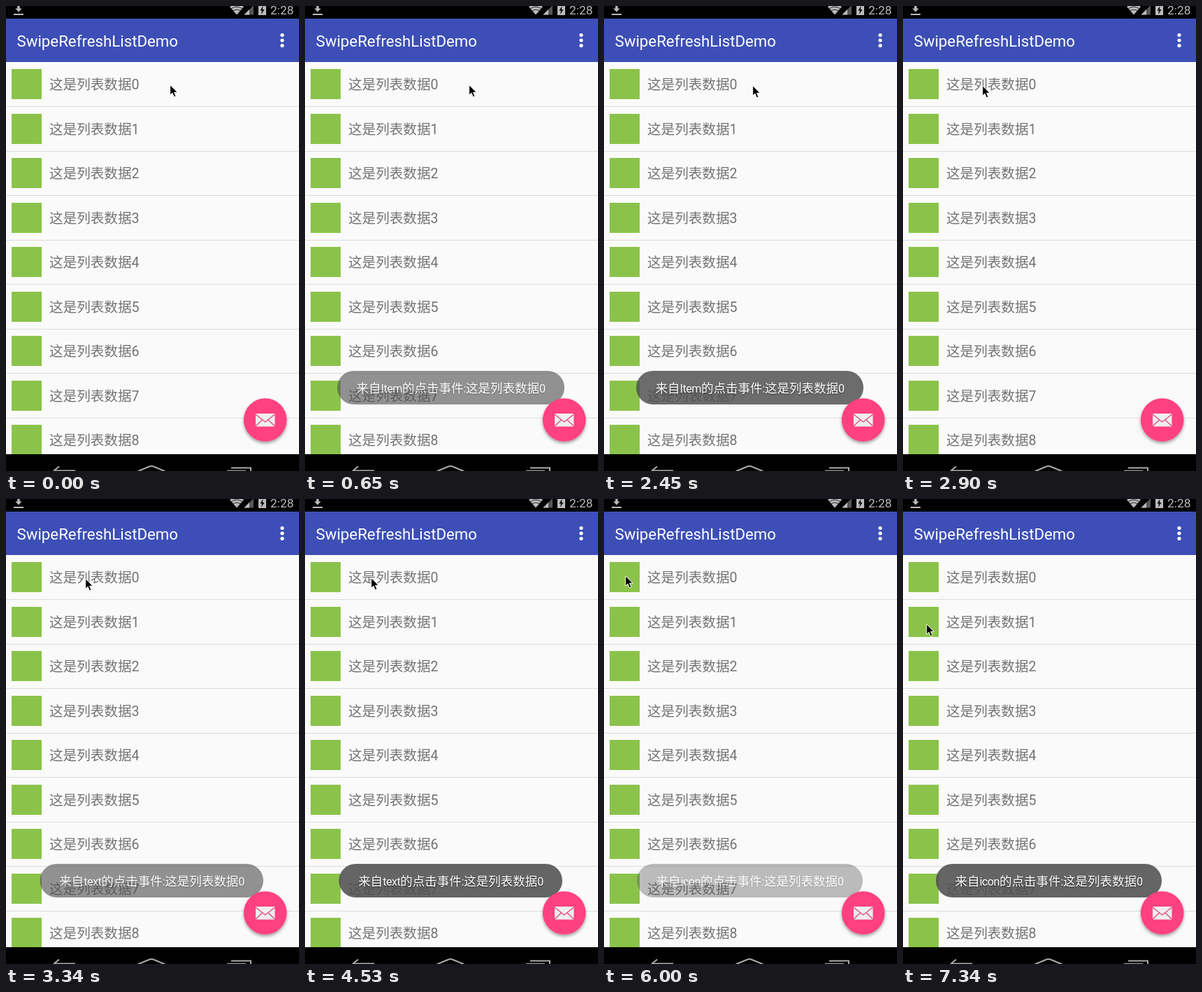
Write an HTML page that moves like this. It is 419 px wide and 664 px high and loops after 8 s.

```html
<!DOCTYPE html>
<html lang="zh-CN">
<head>
<meta charset="utf-8">
<title>SwipeRefreshListDemo</title>
<style>
  html, body { margin: 0; width: 100%; height: 100%; overflow: hidden; background: #fafafa; }
  svg { display: block; width: 419px; height: 664px; }
  text { font-family: Roboto, "Noto Sans CJK SC", sans-serif; }
  .title { font-size: 22.25px; fill: #fff; }
  .clock { font-size: 17.4px; fill: #bbb; }
  .row text { font-size: 19.6px; fill: #737373; }

  .toast { opacity: 0; animation: 8s step-end infinite; }
  .toast rect { fill: #505050; fill-opacity: .88; }
  .toast text { font-size: 17.5px; fill: #fff; text-anchor: middle; text-shadow: 0 1px 2px #0009; }
  .toast tspan { font-size: 16.2px; letter-spacing: -.5px; }
  #item { animation-name: item; }
  #label { animation-name: label; }
  #icon { animation-name: icon; }
  #cursor { animation: move 8s step-end infinite; }

  /* 1% = 80ms; fades decelerate in and accelerate out */
  @keyframes item {
    0% { opacity: 0 }
    6.25% { opacity: .25 }
    8.125% { opacity: .7 }
    10% { opacity: .94 }
    11.875% { opacity: 1 }
    30.625% { opacity: .95 }
    32.5% { opacity: .74 }
    34.375% { opacity: .38 }
    36.25%, 100% { opacity: 0 }
  }
  @keyframes label {
    0% { opacity: 0 }
    39.875% { opacity: .25 }
    41.75% { opacity: .7 }
    43.625% { opacity: .94 }
    45.375% { opacity: 1 }
    64% { opacity: .95 }
    65.875% { opacity: .74 }
    67.625% { opacity: .38 }
    69.5%, 100% { opacity: 0 }
  }
  @keyframes icon {
    0% { opacity: 0 }
    75% { opacity: .42 }
    76.875% { opacity: .8 }
    78.75%, 100% { opacity: 1 }
  }
  @keyframes move {
    0% { transform: translate(234px, 112px) }
    19.375% { transform: translate(235px, 112px) }
    30.625% { transform: translate(212px, 113px) }
    32.5% { transform: translate(160px, 115px) }
    34.375% { transform: translate(119px, 114px) }
    36.25% { transform: translate(113px, 113px) }
    56.625% { transform: translate(94px, 112px) }
    58.5% { transform: translate(62px, 111px) }
    60.375% { transform: translate(37px, 110px) }
    62.125% { transform: translate(30px, 109px) }
    86.125% { transform: translate(29px, 116px) }
    88% { transform: translate(28px, 140px) }
    89.875% { transform: translate(31px, 169px) }
    91.75%, 100% { transform: translate(33px, 178px) }
  }
</style>
</head>
<body>
<svg viewBox="0 0 419 664">
  <defs>
    <filter id="shadow" x="-30%" y="-30%" width="160%" height="170%">
      <feDropShadow dx="0" dy="2.5" stdDeviation="2.2" flood-opacity=".38"/>
    </filter>
  </defs>

  <rect width="419" height="664" fill="#fafafa"/>
  <g id="list"></g>

  <rect y="18" width="419" height="62" fill="#3d4fb6"/>
  <text class="title" x="15.5" y="57.5">SwipeRefreshListDemo</text>
  <g fill="#fff">
    <circle cx="395" cy="41.5" r="2.6"/>
    <circle cx="395" cy="49" r="2.6"/>
    <circle cx="395" cy="56.5" r="2.6"/>
  </g>

  <!-- status bar -->
  <rect width="419" height="18" fill="#000"/>
  <g fill="#bbb">
    <path d="M16.3 0h3.4v3.5h3l-4.7 5l-4.7-5h3zM11 11h14v2H11z"/>
    <path d="M320 1Q330-5 340 1L330 12.5z"/>
    <path d="M354 0V12.5H340.5L353 0z" fill="#555"/>
    <path d="M348 5V12.5H340.5z"/>
    <path d="M361 0h11v13h-11z"/>
    <path d="M367.5 0L363.5 6.5H366L365 12L369.5 5H367z" fill="#000"/>
  </g>
  <path d="M322.5 3.5Q330-1 337.5 3.5M325 6.5Q330 3.5 335 6.5" fill="none" stroke="#000" stroke-width=".8"/>
  <text class="clock" x="378" y="11.5">2:28</text>

  <!-- navigation bar -->
  <rect y="640" width="419" height="24" fill="#000"/>
  <g fill="none" stroke="#aaa" stroke-width="2">
    <path d="M76 657.5L68 664M70 663.5H99"/>
    <path d="M188.5 664.5L204 658Q208 656 212 658L227.5 664.5"/>
    <path d="M322 659.5H350V664M316 664H343"/>
  </g>

  <g class="toast" id="item">
    <rect x="46" y="521" width="325" height="48" rx="24"/>
    <text x="208.5" y="552">来自<tspan>Item</tspan>的点击事件<tspan>:</tspan>这是列表数据<tspan>0</tspan></text>
  </g>
  <g class="toast" id="label">
    <rect x="48.5" y="521" width="319.5" height="48" rx="24"/>
    <text x="208.5" y="552">来自<tspan>text</tspan>的点击事件<tspan>:</tspan>这是列表数据<tspan>0</tspan></text>
  </g>
  <g class="toast" id="icon">
    <rect x="47" y="521" width="323" height="48" rx="24"/>
    <text x="208.5" y="552">来自<tspan>icon</tspan>的点击事件<tspan>:</tspan>这是列表数据<tspan>0</tspan></text>
  </g>

  <!-- mail button -->
  <circle cx="370.7" cy="591" r="30.8" fill="#ff4081" filter="url(#shadow)"/>
  <rect x="357" y="582" width="27.5" height="18.5" fill="#eee"/>
  <path d="M357 583L370.7 594L384.5 583M357 600L366.5 591M384.5 600L375 591" fill="none" stroke="#e0487f" stroke-width="1.3"/>

  <path id="cursor" d="M.7 .8V15.2L4 12.2L6.4 18L9 16.9L6.6 11.3H11.2z" fill="#000" stroke="#fff" stroke-width="1"/>
</svg>
<script>
  const PITCH = 63.5;
  const row = i => `<g class="row" transform="translate(0 ${Math.round(80 + i * PITCH)})">
    <rect x="8" y="10" width="43" height="43" fill="#8bc34a"/>
    <text x="62" y="39">这是列表数据${i}</text>
    <rect y="63" width="419" height="1" fill="#dcdcdc"/>
  </g>`;
  document.getElementById('list').innerHTML = Array.from({ length: 9 }, (_, i) => row(i)).join('');
</script>
</body>
</html>
```
